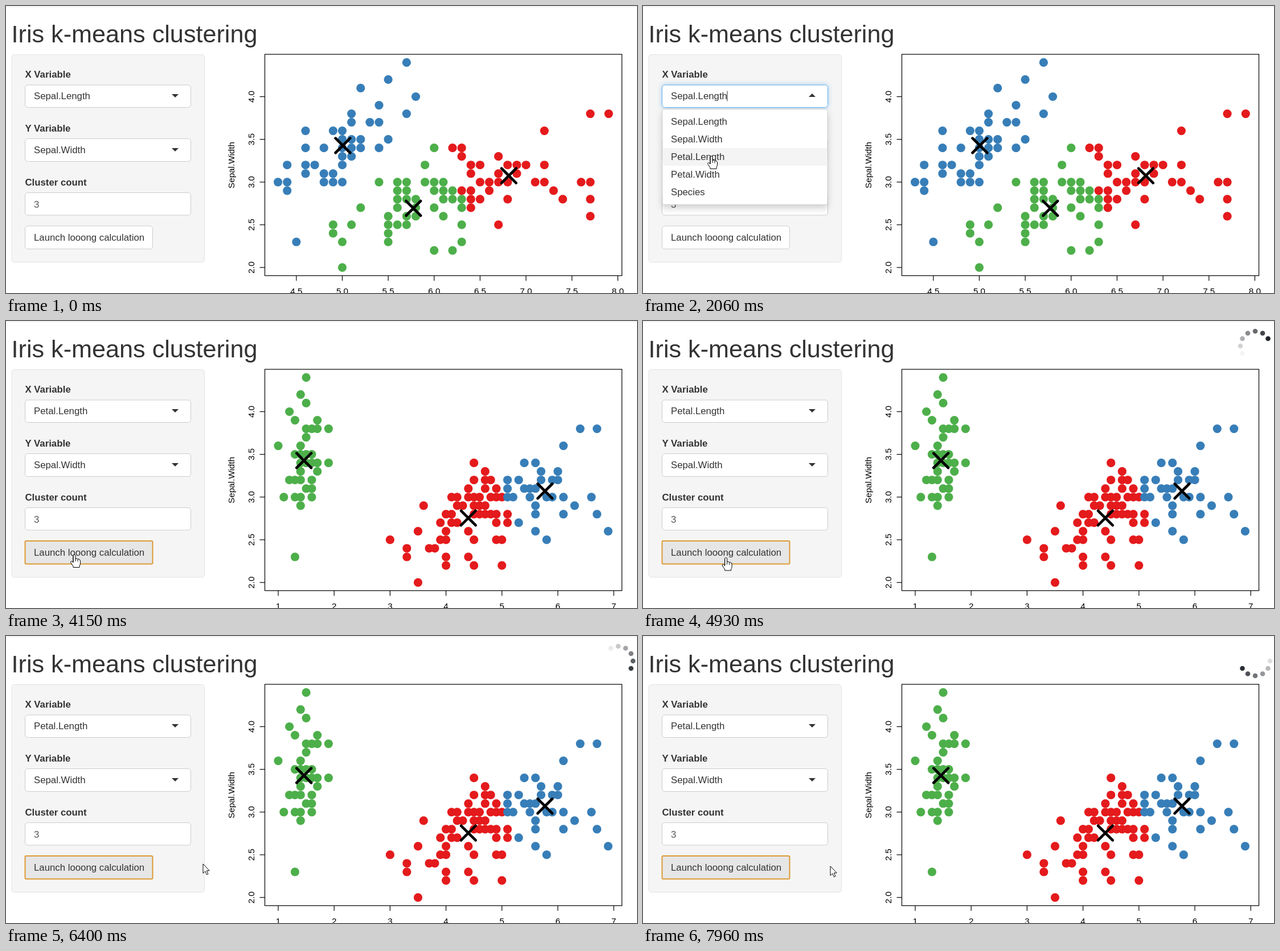
Write an HTML page that moves like this. It is 1108x505 px and loops after 8 s.

```html
<!DOCTYPE html>
<html lang="en">
<head>
<meta charset="utf-8">
<title>Iris k-means clustering</title>
<style>
  html, body { margin: 0; height: 100%; overflow: hidden; background: #fff; }
  svg { display: block; width: 100%; height: 100%; font: 16.8px "Liberation Sans", Arial, sans-serif; fill: #333; }
  .label { font-weight: bold; }
  .field { fill: #fff; stroke: #ccc; }
  .axis { font-size: 15.2px; fill: #000; text-anchor: middle; }
  .line { fill: none; stroke: #000; stroke-width: 1.2; }
  .cross { fill: none; stroke: #000; stroke-width: 4.8; stroke-linecap: round; }
  .menu { fill: #fff; stroke: #d0d0d0; filter: drop-shadow(0 6px 6px rgba(0, 0, 0, .18)); }
  .focus { stroke: #66afe9; filter: drop-shadow(0 0 4px rgba(102, 175, 233, .6)); }
  .pointer { fill: #fff; stroke: #000; stroke-linejoin: round; }
</style>
</head>
<body>
<svg viewBox="0 0 1108 505">
  <rect y="1" width="1108" height="1" fill="#e7e7e7"/>
  <text x="9.5" y="64" font-size="43.2">Iris k-means clustering</text>

  <rect x="10" y="85.5" width="338.5" height="365.5" rx="4.8" fill="#f5f5f5" stroke="#e3e3e3"/>
  <text class="label" x="33.5" y="126">X Variable</text>
  <rect id="xField" class="field" x="33.5" y="139" width="291" height="39.5" rx="4.8"/>
  <text id="xName" x="49" y="164">Sepal.Length</text>
  <path id="arrow" d="M291 155h12l-6 6z"/>
  <text class="label" x="33.5" y="220.5">Y Variable</text>
  <rect class="field" x="33.5" y="233.5" width="291" height="40" rx="4.8"/>
  <text x="49" y="259">Sepal.Width</text>
  <path d="M291 250h12l-6 6z"/>
  <text class="label" x="33.5" y="316">Cluster count</text>
  <rect class="field" x="33.5" y="328.5" width="291" height="39.5" rx="4.8"/>
  <text x="49" y="354.5" fill="#555">3</text>
  <g id="stepper">
    <rect x="293" y="339" width="14" height="19" fill="#f0f0f0"/>
    <path d="M295.5 347h9l-4.5-5zM295.5 350.500h9l-4.5 5z" fill="#505050"/>
  </g>
  <rect id="button" x="33.5" y="387" width="224" height="40.5" rx="4.8"/>
  <text x="49" y="412.5">Launch looong calculation</text>

  <g id="plots"></g>
  <g id="menu">
    <rect class="menu" x="34" y="181.500" width="290" height="168" rx="3"/>
    <rect id="hover" x="34.500" width="289" height="31" fill="#f4f4f4"/>
    <g id="options"></g>
    <path id="caret" d="M148 149.500v18" stroke="#333"/>
  </g>
  <g id="spinner"></g>
  <g id="cursor">
    <path id="tip" class="pointer" d="M0 0V16.500L3.800 12.900 6.400 18.900 9 17.800 6.400 11.900H11.200Z"/>
    <path id="hand" class="pointer" d="M-2 2Q-2 0 0 0T2 2V8Q2.300 6.600 4 7T6 8.500Q6.500 7.500 8 8T9 9.800Q10 9 10.500 10.500V15Q10.500 18 9 20V22.500H-2V20.500L-6 14.500Q-7 12-5.200 11.600-4 11.600-2 14ZM2 8v4M6 8.500v4M-2 2v12"/>
    <path id="beam" d="M-3-8h6M0-8V8M-3 8h6" fill="none" stroke="#000"/>
  </g>
</svg>
<script>
const $ = id => document.getElementById(id);
const show = (id, on) => $(id).style.display = on ? "" : "none";

function add(parent, tag, attrs, text = "") {
  const el = document.createElementNS("http://www.w3.org/2000/svg", tag);
  for (const k in attrs) el.setAttribute(k, attrs[k]);
  el.textContent = text;
  parent.append(el);
  return el;
}

const BLUE = "#377eb8", GREEN = "#4daf4a", RED = "#e41a1c";
const yPos = v => 159.5 + (40 - v) * 15.03;

// Values in tenths: width -> lengths measured at that width.
const sepal = {
  20: [50], 22: [60, 62], 23: [45, 50, 55, 63], 24: [49, 55],
  25: [49, 51, 55, 56, 57, 63, 67], 26: [55, 57, 58, 61, 77],
  27: [52, 56, 58, 60, 63, 64],
  28: [56, 57, 58, 61, 62, 63, 64, 65, 68, 74, 77],
  29: [44, 56, 57, 60, 61, 62, 63, 64, 66, 73],
  30: [43, 44, 48, 49, 50, 54, 56, 57, 59, 60, 61, 65, 66, 67, 68, 71, 72, 76, 77],
  31: [46, 48, 49, 64, 67, 69],
  32: [44, 46, 47, 50, 59, 64, 65, 68, 69, 70, 72],
  33: [50, 51, 63, 67], 34: [46, 48, 50, 51, 52, 54, 60, 62, 63],
  35: [50, 51, 52, 55], 36: [46, 49, 50, 72], 37: [51, 53, 54],
  38: [51, 57, 77, 79], 39: [54], 40: [58], 41: [52], 42: [55], 44: [57]
};
const petal = {
  20: [35], 22: [40, 45, 50], 23: [13, 33, 40, 44], 24: [33, 37, 38],
  25: [30, 39, 40, 45, 49, 50, 58], 26: [35, 40, 44, 56, 69],
  27: [39, 41, 42, 49, 51, 53],
  28: [40, 41, 45, 46, 47, 48, 49, 51, 56, 61, 67],
  29: [14, 36, 42, 43, 45, 46, 47, 56, 63],
  30: [11, 13, 14, 16, 41, 42, 44, 45, 46, 48, 49, 50, 51, 52, 55, 58, 59, 61, 66],
  31: [15, 16, 44, 47, 49, 51, 54, 55, 56],
  32: [12, 13, 14, 16, 45, 47, 48, 51, 53, 57, 59, 60],
  33: [14, 17, 47, 57, 60], 34: [14, 15, 16, 17, 19, 45, 54, 56],
  35: [13, 14, 15, 16], 36: [10, 14, 61], 37: [15],
  38: [15, 16, 17, 19, 64, 67], 39: [13, 17], 40: [12], 41: [15], 42: [14], 44: [15]
};

function makePlot(id, rows, xPos, ticks, digits, centers) {
  const g = add($("plots"), "g", { id });
  for (const y in rows) for (const x of rows[y]) {
    const dist = c => Math.hypot(x - c[0], y - c[1]);
    const near = centers.reduce((a, b) => dist(b) < dist(a) ? b : a);
    add(g, "circle", { cx: xPos(x), cy: yPos(y), r: 7.6, fill: near[2] });
  }
  for (const [x, y] of centers)
    add(g, "path", { class: "cross", d: `M${xPos(x) - 12.8} ${yPos(y) - 12.8}l25.6 25.6m0-25.6l-25.6 25.6` });
  for (const v of ticks) {
    add(g, "path", { class: "line", d: `M${xPos(v)} 474.5v9` });
    add(g, "text", { class: "axis", x: xPos(v), y: 506.5 }, (v / 10).toFixed(digits));
  }
}

function rotated(x, y, text) {
  add($("plots"), "text", { class: "axis", transform: `translate(${x} ${y}) rotate(-90)` }, text);
}

add($("plots"), "rect", { class: "line", x: 454.5, y: 85, width: 627, height: 389.5 });
for (let v = 20; v <= 40; v += 5) {
  add($("plots"), "path", { class: "line", d: `M454.5 ${yPos(v)}h-9` });
  rotated(436, yPos(v), (v / 10).toFixed(1));
}
rotated(401, 280, "Sepal.Width");
makePlot("sepalPlot", sepal, v => 590.5 + (v - 50) * 16.13, [45, 50, 55, 60, 65, 70, 75, 80], 1,
  [[50.06, 34.28, BLUE], [57.74, 26.93, GREEN], [68.13, 30.75, RED]]);
makePlot("petalPlot", petal, v => 478 + (v - 10) * 9.82, [10, 20, 30, 40, 50, 60, 70], 0,
  [[14.6, 34.28, GREEN], [44, 27.55, RED], [57.7, 30.7, BLUE]]);

["Sepal.Length", "Sepal.Width", "Petal.Length", "Petal.Width", "Species"].forEach((name, i) =>
  add($("options"), "text", { x: 49, y: 209 + 31 * i }, name));

const dots = Array.from({ length: 12 }, (_, i) => add($("spinner"), "circle", {
  cx: 1075 + 26 * Math.cos(i * Math.PI / 6),
  cy: 44 + 26 * Math.sin(i * Math.PI / 6),
  r: 4.3, fill: "#1c2026"
}));

const LOOP = 8000, OPEN = 1050, PICK = 2150, REDRAW = 2220, PRESS = 4000, BUSY = 4300;

// Mouse: time, x, y
const path = [
  [350, 934, 488], [1000, 293, 157], [1250, 293, 157], [1680, 122, 249], [1860, 122, 249],
  [1920, 120, 264], [2650, 120, 264], [3000, 106, 308], [3470, 109, 410], [3610, 115, 413],
  [3900, 115, 413], [4010, 118, 424], [4150, 120, 411], [4300, 120, 411], [4700, 132, 417],
  [5170, 160, 416], [5630, 202, 404], [5930, 312, 404], [6100, 346, 401], [6400, 346, 401],
  [6800, 330, 403], [7100, 313, 407], [7400, 318, 407], [7720, 326, 405], [7960, 329, 405],
  [LOOP, 329, 405]
];

function mouse(t) {
  const i = Math.max(1, path.findIndex(p => p[0] > t));
  const [t0, x0, y0] = path[i - 1], [t1, x1, y1] = path[i];
  const u = Math.max(0, (t - t0) / (t1 - t0)), e = u * u * (3 - 2 * u);
  return [x0 + (x1 - x0) * e, y0 + (y1 - y0) * e];
}

function draw(t) {
  const [x, y] = mouse(t);
  const within = (top, bottom, right = 325) => x > 33 && x < right && y > top && y < bottom;
  const open = t >= OPEN && t < PICK;
  const onButton = within(387, 428, 258);
  const onInput = !open && within(328, 368);
  const onHand = onButton || within(139, 178) || (open ? within(181, 349) : within(233, 273));

  $("xField").classList.toggle("focus", open);
  $("xName").textContent = t < PICK ? "Sepal.Length" : "Petal.Length";
  $("arrow").setAttribute("d", open ? "M291 160h12l-6-6z" : "M291 155h12l-6 6z");
  show("menu", open);
  show("caret", (t - OPEN) % 1000 < 500);
  const row = Math.min(4, Math.max(0, Math.floor((y - 188) / 31)));
  $("hover").setAttribute("y", 188 + 31 * row);

  show("sepalPlot", t < REDRAW);
  show("petalPlot", t >= REDRAW);
  show("stepper", onInput || !open && within(298, 328, 142));

  const focused = t >= PRESS, button = $("button");
  button.setAttribute("fill", focused || onButton ? "#e6e6e6" : "#fff");
  button.setAttribute("stroke", focused ? "#dd9a35" : onButton ? "#adadad" : "#ccc");
  button.setAttribute("stroke-width", focused ? 2 : 1);
  button.setAttribute("rx", focused ? 2 : 4.8);

  show("spinner", t >= BUSY);
  const head = (t + 980) / 100;
  dots.forEach((dot, i) => dot.setAttribute("opacity", Math.max(0, 1 - (head - i + 12) % 12 / 6.4)));

  show("cursor", t >= 350);
  $("cursor").setAttribute("transform", `translate(${x} ${y})`);
  show("hand", onHand);
  show("beam", onInput);
  show("tip", !onHand && !onInput);
}

const start = performance.now();
function tick() {
  draw((performance.now() - start) % LOOP);
  requestAnimationFrame(tick);
}
tick();
</script>
</body>
</html>
```
